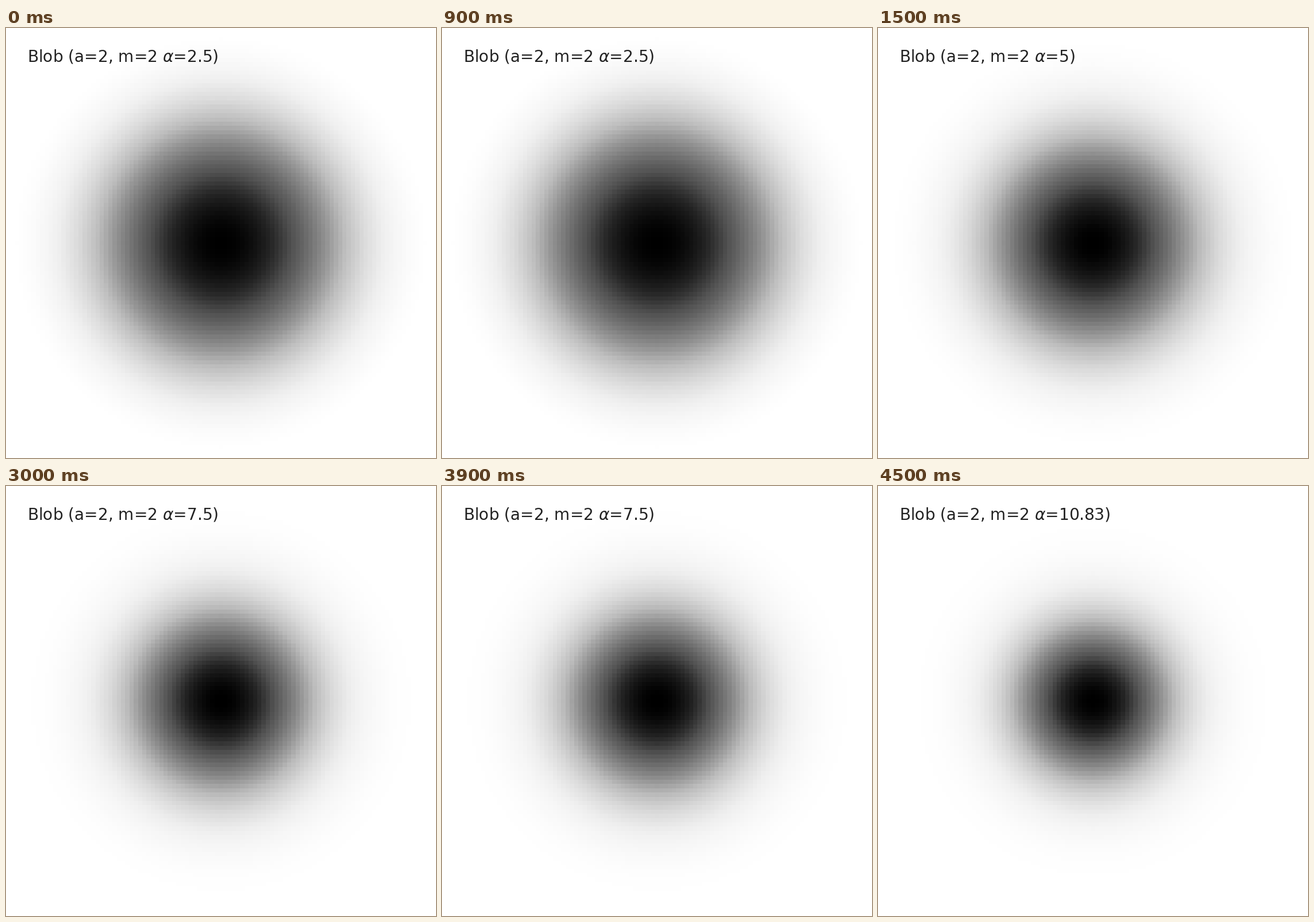
Animation of 748x748 px, one loop 6 s. Source, as a matplotlib script:

```python
import math

import matplotlib.pyplot as plt
import numpy as np
from matplotlib.animation import FuncAnimation
from matplotlib.transforms import IdentityTransform

plt.rcParams["font.family"] = "DejaVu Sans"
plt.rcParams["mathtext.fontset"] = "dejavusans"

STAGE = 748
DPI = 128
RADIUS = 2
ORDER = 2
ALPHAS = (2.5, 5, 7.5, 10.83)
SAMPLES = 101


def bessel_i(order, x):
    """Modified Bessel function of the first kind, by power series."""
    half = np.asarray(x, dtype=float) / 2
    return sum(
        half ** (2 * k + order) / (math.factorial(k) * math.factorial(k + order))
        for k in range(40)
    )


def blob(r, alpha):
    """Kaiser-Bessel window of radius RADIUS, zero outside its support."""
    s = np.sqrt(np.clip(1 - (r / RADIUS) ** 2, 0, None))
    return s**ORDER * bessel_i(ORDER, alpha * s) / bessel_i(ORDER, alpha)


axis = np.linspace(-RADIUS, RADIUS, SAMPLES)
distance = np.hypot(axis[:, None], axis[None, :])

fig = plt.figure(figsize=(STAGE / DPI, STAGE / DPI), dpi=DPI, facecolor="white")
ax = fig.add_axes([0, 0, 1, 1])
ax.axis("off")
image = ax.imshow(
    blob(distance, ALPHAS[0]),
    cmap="Greys", vmin=0, vmax=1, interpolation="nearest", aspect="auto",
)
# Placed in pixels, 28 px high
label = ax.text(
    37, STAGE - 58, "", transform=IdentityTransform(),
    fontsize=28 * 72 / DPI, color="#222222", ha="left", va="baseline",
)


def update(index):
    alpha = ALPHAS[index]
    image.set_data(blob(distance, alpha))
    label.set_text(rf"Blob (a={RADIUS}, m={ORDER} $\alpha$={alpha:g})")
    return image, label


anim = FuncAnimation(
    fig, update, frames=len(ALPHAS), interval=1500, repeat=True, repeat_delay=0
)
plt.show()
```
